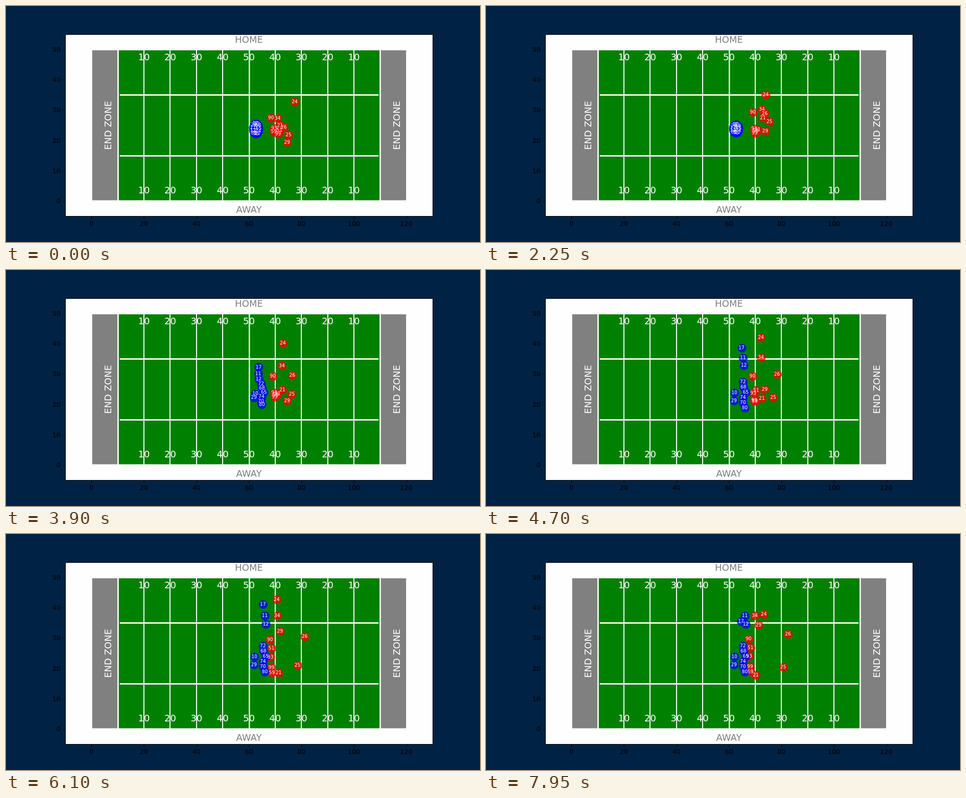
An HTML page that plays this animation: 1000x500 px, repeating every 8 s.

```html
<!DOCTYPE html>
<html lang="en">
<head>
<meta charset="utf-8">
<title>Play animation</title>
<style>
  html, body { margin: 0; width: 100%; height: 100%; overflow: hidden; background: #002244; }
  svg { display: block; width: 1000px; height: 500px; }
  text { font-family: "DejaVu Sans", sans-serif; text-anchor: middle; }
  .tick { font-size: 13.89px; }
  .big { font-size: 19.44px; }
  .num { font-size: 9.72px; fill: #fff; }
</style>
</head>
<body>
<svg id="stage" viewBox="0 0 1000 500" xmlns="http://www.w3.org/2000/svg"></svg>
<script>
const NS = 'http://www.w3.org/2000/svg';
const stage = document.getElementById('stage');
const LOOP = 8000, STEP = 50;

function add(tag, attrs, parent = stage, text) {
  const el = document.createElementNS(NS, tag);
  for (const k in attrs) el.setAttribute(k, attrs[k]);
  if (text !== undefined) el.textContent = text;
  parent.appendChild(el);
  return el;
}
const line = (x1, y1, x2, y2, stroke, width) =>
  add('line', { x1, y1, x2, y2, stroke, 'stroke-width': width });
const label = (x, y, text, cls, fill, more) =>
  add('text', { x, y, class: cls, fill, ...more }, stage, text);

// data units to pixels
const px = x => 125 + (x + 10) * 775 / 140;
const py = y => 445 - (y + 5) * 385 / 60;
const snap = v => Math.floor(v + 0.5);

function drawField() {
  add('rect', { x: 125, y: 60, width: 775, height: 385, fill: '#fefefe' });
  const zone = (a, b, fill) => {
    const x = snap(px(a)) + 0.5;
    add('rect', { x, y: 92.5, width: snap(px(b)) + 0.5 - x, height: 320.5,
      fill, stroke: '#fff', 'stroke-width': 2.78 });
  };
  zone(0, 10, '#808080');
  zone(110, 120, '#808080');
  zone(10, 110, '#008000');

  for (let x = 20; x <= 100; x += 10) {
    const mid = x === 60;
    const c = snap(px(x)) + (mid ? 0.5 : 0);
    line(c, 92.5, c, 413, '#fff', mid ? 2.78 : 2.08);
  }
  for (const y of [188.5, 317.5]) line(240, y, 786, y, '#fff', 2.78);
}

function drawAxes() {
  add('rect', { x: 125.5, y: 60.5, width: 775, height: 385, fill: 'none', stroke: '#000', 'stroke-width': 1.11 });
  for (let v = 0; v <= 120; v += 20) {
    const x = snap(px(v)) + 0.5;
    line(x, 445.5, x, 450.4, '#000', 1.11);
    label(px(v), 466, v, 'tick', '#000');
  }
  for (let v = 0; v <= 50; v += 10) {
    const y = snap(py(v)) + 0.5;
    line(120.6, y, 125.5, y, '#000', 1.11);
    label(115.3, Math.round(py(v) + 5), v, 'tick', '#000', { style: 'text-anchor:end' });
  }
}

function drawTexts() {
  for (let x = 20; x <= 100; x += 10) {
    const yards = 50 - Math.abs(60 - x);
    for (const y of [115, 397]) label(px(x), y, yards, 'big', '#fff');
  }
  label(512.5, 78, 'HOME', 'big', '#808080');
  label(512.5, 438, 'AWAY', 'big', '#808080');
  for (const x of [222, 831])
    label(0, 0, 'END ZONE', 'big', '#fff', { transform: `translate(${x} 253) rotate(-90)` });
}

// smooth curve through the points that never overshoots
function curve(ts, vs) {
  const n = ts.length, slope = [], m = [];
  for (let i = 0; i < n - 1; i++) slope.push((vs[i + 1] - vs[i]) / (ts[i + 1] - ts[i]));
  for (let i = 0; i < n; i++) {
    const a = slope[i - 1], b = slope[i];
    if (a === undefined) m.push(b);
    else if (b === undefined) m.push(a);
    else m.push(a * b > 0 ? 2 * a * b / (a + b) : 0);
  }
  return t => {
    let i = 0;
    while (i < n - 2 && t >= ts[i + 1]) i++;
    const h = ts[i + 1] - ts[i], s = Math.min(1, (t - ts[i]) / h);
    const s2 = s * s, s3 = s2 * s;
    return (2 * s3 - 3 * s2 + 1) * vs[i] + (s3 - 2 * s2 + s) * h * m[i]
         + (3 * s2 - 2 * s3) * vs[i + 1] + (s3 - s2) * h * m[i + 1];
  };
}

drawField();
drawAxes();
const dots = add('g', { opacity: 1 });
drawTexts();
const nums = add('g', {});
const players = [];

function player(fill, num, times, points) {
  players.push({
    x: curve(times, points.map(p => p[0])),
    y: curve(times, points.map(p => p[1])),
    dot: add('circle', { r: 9.3, fill, 'fill-opacity': 0.75 }, dots),
    num: add('text', { class: 'num' }, nums, num)
  });
}

// red front: regroup, wait, take the line, then creep forward
function rusher(num, start, wait, spot) {
  const push = [spot[0] - 6, spot[1] - 3];
  player('#f00', num, [0, 1050, 4000, 5500, 6800, LOOP], [start, wait, wait, spot, push, push]);
}
rusher(90, [559, 237], [563, 225], [560, 225]);
rusher(93, [566, 259], [566, 260], [561, 262]);
rusher(51, [577, 263], [573, 262], [564, 244]);
rusher(59, [565, 266], [569, 264], [564, 295]);
rusher(99, [574, 271], [567, 269], [563, 284]);

// red backs roam freely
function back(num, ...points) {
  player('#f00', num, [0, 2250, 3900, 5500, 6800, 7950].slice(0, points.length), points);
}
back(24, [609, 203], [590, 188], [584, 155], [575, 137], [568, 145], [586, 170]);
back(34, [573, 238], [582, 219], [582, 203], [576, 173], [567, 173]);
back(21, [578, 253], [584, 237], [583, 254], [579, 289], [569, 299]);
back(26, [586, 257], [588, 228], [604, 223], [624, 219], [634, 215], [637, 212]);
back(25, [596, 273], [598, 245], [603, 263], [609, 276], [623, 280], [627, 282]);
back(29, [593, 289], [589, 265], [593, 277], [581, 219], [575, 193]);

// blue team in huddle order, clockwise: number and place in the formation
const lineY = k => 237 + 11 * k;
const team = [
  [72, 542, lineY(0)], [68, 543, lineY(1)], [65, 548, lineY(2)], [74, 542, lineY(3)],
  [10, 524, 260], [70, 542, lineY(4)], [80, 546, lineY(5)],
  [12, 548, 191], [11, 546, 173], [29, 523, 277], [17, 542, 149]
];
team.forEach(([num, x, y], i) => {
  const a = -1.22 + i * 2 * Math.PI / team.length;
  const ring = ry => [527 + 6 * Math.cos(a), 260 + ry * Math.sin(a)];
  const arrive = y < 200 ? 5400 : 4600;
  const end = num === 17 ? [538, 185] : [x, y];   // one receiver goes in motion
  player('#00f', num, [0, 1050, 2600, arrive, 6800, 7950],
    [ring(11), ring(9), ring(9), [x, y], [x, y], end]);
});

function render(ms) {
  const t = Math.floor((ms % LOOP) / STEP) * STEP;
  for (const p of players) {
    const x = p.x(t), y = p.y(t);
    p.dot.setAttribute('cx', (x + 0.6).toFixed(2));
    p.dot.setAttribute('cy', (y + 0.5).toFixed(2));
    p.num.setAttribute('x', Math.round(x));
    p.num.setAttribute('y', Math.round(y) + 3);
  }
}
function tick() {
  render(performance.now());
  requestAnimationFrame(tick);
}
render(0);
requestAnimationFrame(tick);
</script>
</body>
</html>
```
